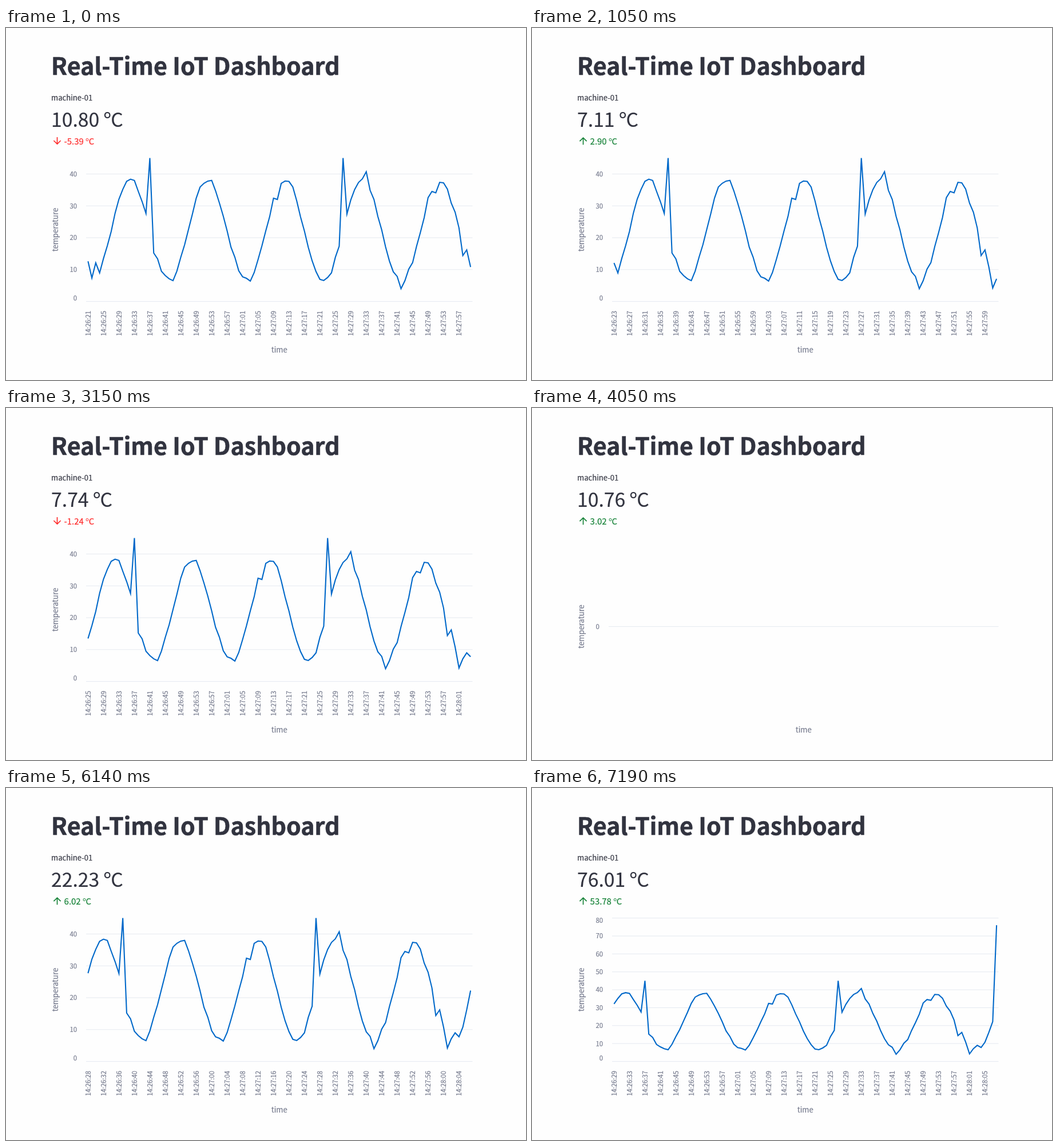
An HTML page with a canvas for the animation above (8 s loop, 909 by 616 pixels).

```html
<!DOCTYPE html>
<html lang="en">
<head>
<meta charset="utf-8">
<title>Real-Time IoT Dashboard</title>
<style>
  html, body { margin: 0; width: 100%; height: 100%; overflow: hidden; background: #fefefe; }
  canvas { display: block; width: 909px; height: 616px; }
</style>
</head>
<body>
<canvas id="stage"></canvas>
<script>
const W = 909, H = 616, LOOP = 8000, TICK = 149.75;
const SANS = '"Noto Sans CJK JP", "Noto Sans CJK SC", "Noto Sans CJK KR", "Noto Sans CJK TC", "Noto Sans CJK", "Noto Sans", sans-serif';
const INK = '#31333f', GREY = '#777c8f', GRID = '#e6eaf1', BLUE = '#0068c9';
const RED = '#ff2b2b', GREEN = '#158237';
const LEFT = 79.1, RIGHT = 815.5, TOP = 227.6, BASE = 478.5, COUNT = 100;
const SMALL = 11.35, BODY = 13.1, DELTA = 14.95, BIG = 33.7, HEAD = 41.2;

// one reading per second, the first at 14:26:21
const FIRST = (14 * 60 + 26) * 60 + 21;

// a 20 second wave with jitter, a few marked readings and the newest ones
const marks = { 0: 12.6, 2: 12.1, 16: 45, 17: 15.2, 49: 32, 66: 45, 72: 40.7, 81: 4, 90: 34.1, 97: 14.4 };
const newest = [16.19, 10.8, 4.21, 7.11, 8.98, 7.74, 10.76, 16.21, 22.23, 76.01];

let seed = 7;
function random() {
  seed = seed * 16807 % 2147483647;
  return seed / 2147483647;
}

function wave(i) {
  const jitter = (random() - 0.5) * 2;
  return marks[i] ?? 22.3 - 15.8 * Math.cos((i - 1) * Math.PI / 10) + jitter;
}

const temps = Array.from({ length: 98 }, (_, i) => wave(i)).concat(newest);

const canvas = document.getElementById('stage');
const ctx = canvas.getContext('2d');
const dpr = window.devicePixelRatio || 1;
canvas.width = Math.round(W * dpr);
canvas.height = Math.round(H * dpr);
ctx.scale(dpr, dpr);

function text(str, x, y, size, color, align = 'left', weight = 400) {
  ctx.font = `${weight} ${size}px ${SANS}`;
  ctx.fillStyle = ctx.strokeStyle = color;
  ctx.textAlign = align;
  ctx.fillText(str, x, y);
  // a hairline outline gives the slightly heavier face
  ctx.lineWidth = weight > 400 ? 0.6 : 0.2;
  ctx.strokeText(str, x, y);
}

function upright(str, x, y, size, align) {
  ctx.save();
  ctx.translate(x, y);
  ctx.rotate(-Math.PI / 2);
  text(str, 0, 0, size, GREY, align);
  ctx.restore();
}

function celsius(value, x, y, size, color) {
  const num = value.toFixed(2) + ' ';
  text(num, x, y, size, color);
  x += ctx.measureText(num).width;
  text('C', x + size * 0.371, y, size, color);
  ctx.font = `${size}px "Noto Sans", "Open Sans", sans-serif`;
  ctx.fillText('°', x - size * 0.02, y);
}

function arrow(up, color) {
  ctx.save();
  ctx.translate(89.5, 197.6);
  ctx.scale(0.835, up ? 0.835 : -0.835);
  ctx.beginPath();
  ctx.moveTo(-7.3, 0.7);
  ctx.lineTo(0, -6.6);
  ctx.lineTo(7.3, 0.7);
  ctx.moveTo(0, -6.6);
  ctx.lineTo(0, 8);
  ctx.strokeStyle = color;
  ctx.lineWidth = 2;
  ctx.stroke();
  ctx.restore();
}

function gridLine(left, y) {
  ctx.fillStyle = GRID;
  ctx.fillRect(left, y - 0.5, RIGHT - left, 1.05);
}

function axisTitles(left, mid) {
  upright('temperature', 91.3, mid, BODY, 'center');
  text('time', (left + RIGHT) / 2, 567.5, BODY, GREY, 'center');
}

function clock(sec) {
  return [sec / 3600, sec / 60 % 60, sec % 60]
    .map(n => String(Math.floor(n)).padStart(2, '0')).join(':');
}

function emptyChart() {
  gridLine(134, 382.4);
  text('0', 117.7, 386.8, SMALL, GREY, 'right');
  axisTitles(134, 382.4);
}

function chart(shift) {
  const left = 140, step = (RIGHT - left) / COUNT;
  const data = temps.slice(shift, shift + COUNT);
  const max = Math.ceil(Math.max(...data) / 5) * 5;
  const px = i => left + (i + 0.5) * step;
  const py = v => BASE - v * (BASE - TOP) / max;

  for (let v = 0; v <= max; v += 10) {
    const y = py(v);
    const nudge = v === 0 ? -1.8 : v === max ? 8.8 : 4.4;
    gridLine(left, y);
    text(String(v), 124, y + nudge, SMALL, GREY, 'right');
  }
  for (let i = 0; i < COUNT; i += 4) {
    upright(clock(FIRST + shift + i), px(i) + 4.6, 494.9, SMALL, 'right');
  }
  axisTitles(left, (TOP + BASE) / 2);

  ctx.beginPath();
  data.forEach((v, i) => ctx.lineTo(px(i), py(v)));
  ctx.strokeStyle = BLUE;
  ctx.lineWidth = 2.09;
  ctx.stroke();
}

function draw(t) {
  // three readings arrive every 20 ticks; some redraws blank the chart for one tick
  const n = Math.floor(t / TICK);
  const shift = Math.ceil(3 * n / 20);
  const empty = n > 7 && n % 20 === 7;
  const last = shift + COUNT - 1;
  const diff = temps[last] - temps[last - 1];
  const color = diff < 0 ? RED : GREEN;

  ctx.fillStyle = '#fefefe';
  ctx.fillRect(0, 0, W, H);
  text('Real-Time IoT Dashboard', LEFT, 82, HEAD, INK, 'left', 700);
  text('machine-01', LEFT, 127.3, BODY, INK);
  celsius(temps[last], LEFT, 172.6, BIG, INK);
  arrow(diff > 0, color);
  celsius(diff, 101.6, 203.6, DELTA, color);
  if (empty) emptyChart();
  else chart(shift);
}

let start;
function tick(now) {
  if (start === undefined) start = now;
  draw((now - start) % LOOP);
  requestAnimationFrame(tick);
}
draw(0);
requestAnimationFrame(tick);
</script>
</body>
</html>
```
